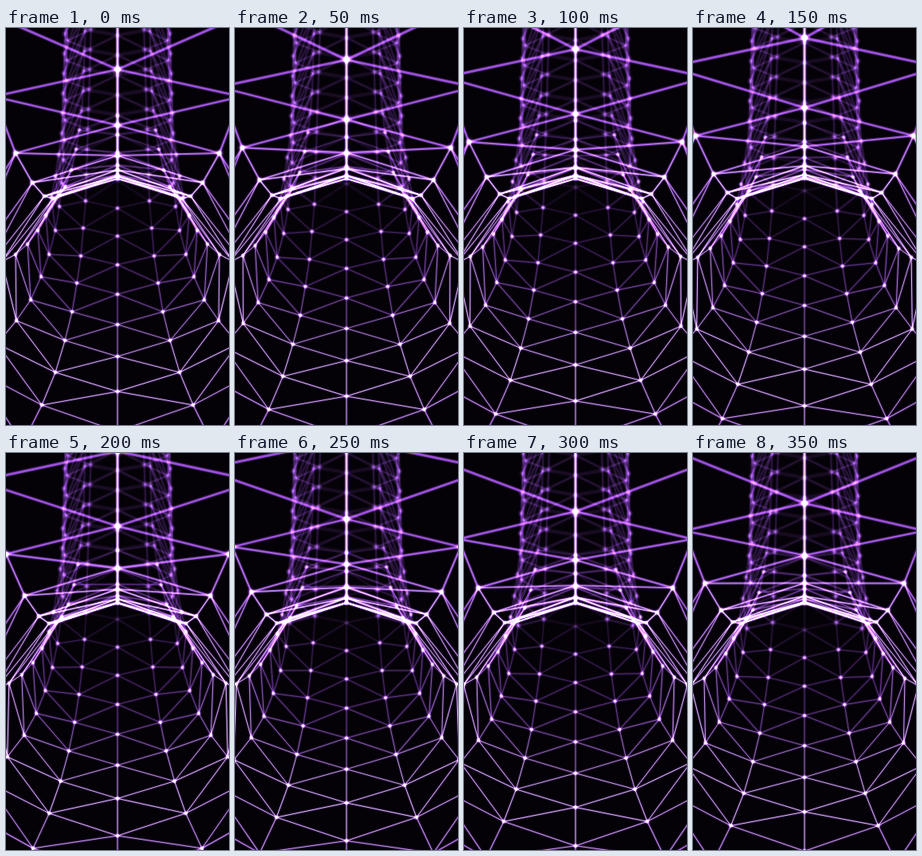
These frames come from a looping animation (280x498 px, 0.4 s). An HTML page with a canvas:

```html
<!DOCTYPE html>
<html lang="en">
<head>
<meta charset="utf-8">
<title>Tunnel lattice</title>
<style>
html, body { margin: 0; height: 100%; overflow: hidden; background: #040107; }
canvas { display: block; width: 100vw; height: 100vh; }
</style>
</head>
<body>
<canvas id="stage" width="280" height="498"></canvas>
<script>
const ctx = document.getElementById('stage').getContext('2d');
const W = 280, H = 498, CX = W / 2;
const LOOP = 400, STEP = 50;
const FIRST = -2, FAR = -9, NEAR = 11;

// Strands of one half of the tube, from floor to ceiling.
// dx: distance from the mirror axis, y: height, for rings FIRST to NEAR.
const strands = [
  { dx: null,
    y: [158, 191, 226, 261, 297, 334, 372, 412, 456, 506, 564, 635, 720, 820] },
  { dx: [38, 39, 40, 43, 46, 51, 57, 66, 78, 95, 119, 152, 195, 250],
    y: [152, 184, 217, 251, 286, 320, 356, 392, 432, 473, 521, 580, 650, 735] },
  { dx: [68, 70, 73, 78, 86, 96, 109, 127, 151, 180, 215, 258, 310, 375],
    y: [166, 195, 224, 254, 284, 312, 341, 367, 396, 428, 465, 510, 560, 620] },
  { dx: [70, 74, 78, 83, 90, 100, 113, 128, 145, 165, 195, 240, 300, 380],
    y: [132, 159, 186, 212, 235, 254, 271, 284, 293, 303, 316, 335, 360, 395] },
  { dx: [43, 45, 48, 52, 58, 66, 74, 81, 92, 107, 128, 155, 200, 270],
    y: [78, 103, 128, 152, 178, 199, 210, 214, 211, 194, 157, 86, -35, -260] },
  { dx: null,
    y: [60, 85, 110, 134, 156, 172, 184, 189, 186, 178, 160, 122, 52, -62] }
];
const TOP = strands.length - 1;

const clamp = (v, lo, hi) => Math.max(lo, Math.min(hi, v));
const mix = (a, b, t) => a + (b - a) * t;

// Catmull-Rom through the keys, with straight continuations at both ends.
function sample(keys, ring, farStep) {
  const n = keys.length;
  const key = i => i < 0 ? keys[0] + i * farStep
    : i < n ? keys[i]
    : keys[n - 1] + (i - n + 1) * (keys[n - 1] - keys[n - 2]);
  const pos = ring - FIRST, i = Math.floor(pos), t = pos - i;
  const [a, b, c, d] = [key(i - 1), key(i), key(i + 1), key(i + 2)];
  return b + 0.5 * t * (c - a + t * (2 * a - 5 * b + 4 * c - d + t * (3 * (b - c) + d - a)));
}

function node(col, ring) {
  const { dx, y } = strands[col];
  return { col, ring, x: dx ? sample(dx, ring, 0.8) : 0, y: sample(y, ring, 25) };
}

const focusAt = ring => Math.exp(-(((ring - 5.8) / 1.9) ** 2));

function tint(focus, alpha) {
  const [r, g, b] = [mix(132, 246, focus), mix(68, 228, focus), mix(188, 255, focus)];
  return `rgba(${r | 0},${g | 0},${b | 0},${alpha})`;
}

function strokeLine(a, b, width, color) {
  ctx.lineWidth = width;
  ctx.strokeStyle = color;
  ctx.beginPath();
  ctx.moveTo(a.x, a.y);
  ctx.lineTo(b.x, b.y);
  ctx.stroke();
}

function link(a, b) {
  const ring = (a.ring + b.ring) / 2, col = (a.col + b.col) / 2;
  const axis = a.col === TOP && b.col === TOP;
  const focus = focusAt(ring) * (axis ? 1 : 0.85);
  const alpha = ring < 0 ? (col < 1 || col > 4 ? 0.1 : 0.22)
    : clamp(0.2 + ring * 0.11 + (col > 1 && col < 4 ? 0.08 : 0), 0, 0.88);
  let width = 0.9 + (col > 3.5 ? 0.7 : 0.1) + clamp(ring - 7, 0, 3) * 0.45;
  if (axis && ring > 4) width = 3;
  if (ring < 0) width = 2;
  strokeLine(a, b, width + 2.6, tint(0, alpha * 0.28));
  strokeLine(a, b, width, tint(axis && ring > 6 ? 0.7 : focus, alpha));
}

function dot({ col, ring, x, y }) {
  const far = ring < 0;
  const axisFade = far && (col === 0 || col === TOP) ? 0.3 : 1;
  const alpha = far ? clamp(0.62 + ring * 0.025, 0.3, 0.7) * axisFade : 0.95;
  const focus = far ? 0.25 : clamp(0.5 + ring * 0.09, 0, 1);
  const radius = far ? 4.8 : 4.2 + (col > 3 ? clamp(ring - 6, 0, 4) * 1.1 : 0);
  const glow = ctx.createRadialGradient(x, y, 0, x, y, radius);
  glow.addColorStop(0, tint(focus, alpha));
  glow.addColorStop(far ? 0.35 : 0.42, tint(focus * 0.8, alpha * 0.75));
  glow.addColorStop(0.65, tint(0, alpha * 0.35));
  glow.addColorStop(1, tint(0, 0));
  ctx.fillStyle = glow;
  ctx.beginPath();
  ctx.arc(x, y, radius, 0, 7);
  ctx.fill();
}

function drawHalf(side, phase) {
  ctx.setTransform(side, 0, 0, 1, CX, 0);
  const get = (col, k) => node(col, k + phase);
  for (let k = FAR; k < NEAR; k++) {
    for (let col = 0; col <= TOP; col++) {
      const here = get(col, k);
      const onAxis = col === 0 || col === TOP;
      if (!onAxis || side > 0) {
        link(here, get(col, k + 1));
        dot(here);
      }
      // Odd strands sit half a ring behind the even ones.
      if (col % 2 === 0) {
        for (const next of [col - 1, col + 1]) {
          if (next < 0) continue;
          link(here, get(next, k));
          link(here, get(next, k + 1));
        }
      }
    }
  }
}

function frame(now) {
  const phase = Math.floor((now % LOOP) / STEP) * STEP / LOOP;
  ctx.setTransform(1, 0, 0, 1, 0, 0);
  ctx.globalCompositeOperation = 'source-over';
  ctx.fillStyle = '#040107';
  ctx.fillRect(0, 0, W, H);
  ctx.globalCompositeOperation = 'lighter';
  drawHalf(1, phase);
  drawHalf(-1, phase);
}

const start = performance.now();
function tick() {
  frame(performance.now() - start);
  requestAnimationFrame(tick);
}
tick();
</script>
</body>
</html>
```
